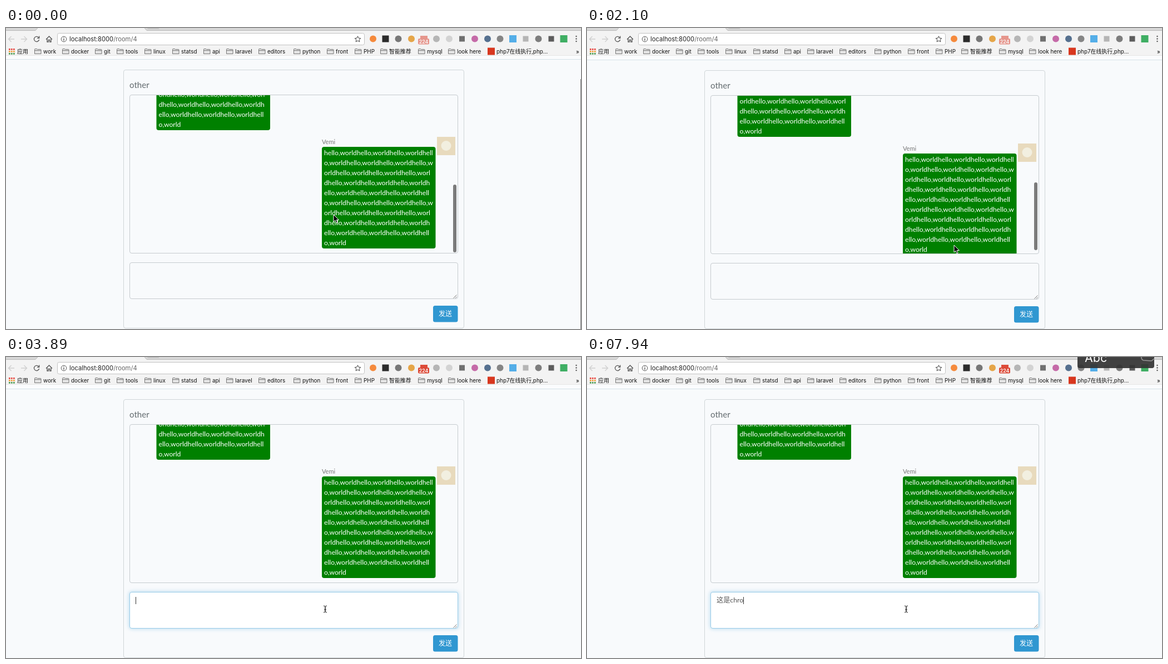
Animation, 1034 px wide and 542 px high, one loop 8 s. Source, as an HTML page:

```html
<!DOCTYPE html>
<html lang="zh">
<head>
<meta charset="utf-8">
<title>Chat room</title>
<style>
html, body { margin: 0; width: 100%; height: 100%; overflow: hidden; background: #f8fafc; }
svg { display: block; width: 1034px; height: 542px; }
text { white-space: pre; }
.ui { font: 9.9px Inter, "Noto Sans CJK SC", sans-serif; fill: #111; }
.web { font: 12.2px Lato, "Noto Sans CJK SC", sans-serif; fill: #555; }
.ime { font: 13px "Noto Sans CJK SC", "Noto Sans", sans-serif; fill: #fff; }
.ime .hot { fill: #8fd5f5; }
</style>
</head>
<body>
<svg id="stage" viewBox="0 0 1034 542" xmlns="http://www.w3.org/2000/svg">
  <defs>
    <clipPath id="chatClip"><rect x="223" y="122" width="589" height="284" rx="3"/></clipPath>
    <filter id="blur" x="-10%" y="-50%" width="120%" height="200%"><feGaussianBlur stdDeviation="3"/></filter>
    <filter id="drop" x="-10%" y="-20%" width="120%" height="150%"><feDropShadow dx="0" dy="1" stdDeviation="1" flood-opacity=".45"/></filter>
  </defs>
  <rect width="1034" height="542" fill="#f8fafc"/>

  <g id="page">
    <rect y="40" width="1034" height="17" fill="#fbfcfd"/>
    <path d="M0 57.5H1034" stroke="#d5e1e8"/>
    <g fill="none" stroke="#cfd5d8">
      <rect x="211.5" y="76.5" width="612" height="465" rx="3.5"/>
      <rect x="222.5" y="121.5" width="590" height="285" rx="3.5" stroke="#c6cbcf"/>
    </g>
    <text x="222" y="109" class="web" style="font-size:15.1px;fill:#636b6f">other</text>
    <g clip-path="url(#chatClip)">
      <g id="feed"></g>
      <rect id="thumb" x="804" width="6" height="122" rx="3" fill="#7b7b7b"/>
    </g>
    <rect id="glow" x="221" y="422" width="593" height="68" rx="5" fill="#98cbe8" opacity=".6" filter="url(#blur)"/>
    <rect id="field" x="222.5" y="423.5" width="590" height="65" rx="3.5"/>
    <path d="M804.5 487.5L810.5 481.5M808 487.5L810.5 485" stroke="#777" fill="none"/>
    <text id="typed" class="web" x="233" y="442"></text>
    <path id="under" stroke="#555"/>
    <rect id="caret" y="432" width="1" height="13" fill="#333"/>
    <rect x="768" y="501" width="44.500" height="29.500" rx="3.500" fill="#3097d1"/>
    <text x="790" y="520" text-anchor="middle" class="web" style="font-size:12px;font-weight:500;fill:#fff">发送</text>
  </g>

  <rect id="pageBar" x="1033" y="92" width="1" height="450" fill="#777"/>

  <g id="chrome">
    <rect width="1034" height="50" fill="#f3f3f3"/>
    <path d="M0 0H57L53 4.500H0ZM249 0L253 4.500H1034V0Z" fill="#d7d7d7"/>
    <path d="M0 4.500H53L57 0M249 0L253 4.500H1034" fill="none" stroke="#b9b9b9"/>
    <path d="M253 0H274L276 2H256Z" fill="#c3c3c3"/>
    <path d="M0 49.500H1034" stroke="#e6e6e6"/>
    <rect x="92.500" y="9.500" width="552" height="21" rx="3" fill="#fff" stroke="#c2c2c2"/>
    <g fill="none" stroke="#d0d0d0" stroke-width="1.300">
      <path d="M15 20H5M9.500 15L4.500 20L9.500 25M27 20H37M32.500 15L37.500 20L32.500 25"/>
      <path d="M59 17.500A4.600 4.600 0 1 0 59.600 21M59.700 14.500V18.300H56" stroke="#555"/>
      <path d="M72 20.500L77.500 15L83 20.500M74 19.500V25H76.300V21.500H78.700V25H81V19.500" stroke="#555"/>
      <circle cx="104" cy="20" r="4.800" stroke="#555" stroke-width="1"/>
      <path d="M104 19V23M104 16.700V17.900" stroke="#555"/>
      <path d="M632.500 14.700L634.100 18.200L637.900 18.600L635 21.100L635.900 24.900L632.500 22.900L629.100 24.900L630 21.100L627.100 18.600L630.900 18.200Z" stroke="#444" stroke-width="1"/>
    </g>
    <text x="114" y="24" class="ui" style="font-size:11.200px;fill:#222">localhost:8000<tspan fill="#666">/room/4</tspan></text>
    <g id="icons"></g>
    <g id="marks"></g>
  </g>

  <g id="hud">
    <path d="M882 0H1020V16Q1020 20 1016 20H886Q882 20 882 16Z" fill="#333" opacity=".92"/>
    <path d="M997 0V1Q997 5 1001 6L1015 7L1020 3" fill="none" stroke="#999" stroke-width="1.500"/>
    <text id="mode" class="ui" x="895" y="9" style="font-size:21.500px;fill:#fff"></text>
  </g>

  <g id="ime" class="ime">
    <rect id="imeBox" x="235" y="447" height="46" rx="3" fill="#484848" filter="url(#drop)"/>
    <text id="pinyin" class="hot" x="246" y="463"></text>
    <rect id="imeCaret" y="451" width="1" height="15" fill="#fff"/>
    <g id="words"></g>
    <g id="pager" fill="none" stroke-width="1.700">
      <path d="M-16 480L-19 483L-16 486" stroke="#999"/>
      <path d="M-11 480L-8 483L-11 486" stroke="#8fd5f5"/>
    </g>
  </g>

  <path id="arrow" d="M0 0V13L3 10.300L5 15L7.200 14L5.200 9.500H9.300Z" fill="#000" stroke="#fff" stroke-width="1"/>
  <g id="beam" fill="none">
    <path d="M571 448Q574 448 574 450V458Q574 460 571 460M577 448Q574 448 574 450V458Q574 460 577 460" stroke="#fff" stroke-width="2.500" opacity=".7"/>
    <path d="M571 448Q574 448 574 450V458Q574 460 571 460M577 448Q574 448 574 450V458Q574 460 577 460M572 455H576" stroke="#222"/>
  </g>
</svg>
<script>
const LOOP = 8000;
const $ = id => document.getElementById(id);
const set = (el, attrs) => { for (const k in attrs) el.setAttribute(k, attrs[k]); };

function add(parent, tag, attrs, text) {
  const el = document.createElementNS("http://www.w3.org/2000/svg", tag);
  set(el, attrs);
  if (text) el.textContent = text;
  parent.appendChild(el);
  return el;
}

// Value of the latest [time, value] pair that has started
function at(keys, t) {
  let v = keys[0][1];
  for (const [k, x] of keys) if (t >= k) v = x;
  return v;
}

function bubble(x, y) {
  const feed = $("feed"), all = "hello,world".repeat(30);
  add(feed, "rect", { x, y, width: 204.5, height: 183, rx: 4, fill: "#008000" });
  let from = 0;
  [37, 36, 36, 35, 36, 36, 36, 35, 36, 7].forEach((n, i) => {
    add(feed, "text", { x: x + 4, y: y + 15 + i * 18, class: "web", style: "fill:#fff" }, all.slice(from, from + n));
    from += n;
  });
}

function buildFeed() {
  bubble(270.5, 2);
  bubble(568, 215);
  add($("feed"), "text", { x: 568, y: 210, class: "web", style: "font-size:11px;fill:#777" }, "Vemi");
  add($("feed"), "rect", { x: 775, y: 197, width: 33, height: 33, fill: "#e8dabd" });
  add($("feed"), "circle", { cx: 791.5, cy: 213, r: 9, fill: "#f2efe0" });
}

function buildMarks() {
  const g = $("marks");
  const colors = ["#e8453c", "#f29d38", "#4a9b50"];
  for (let i = 0; i < 9; i++)
    add(g, "rect", { x: 5 + i % 3 * 4, y: 37 + (i / 3 | 0) * 4, width: 2.7, height: 2.7, fill: colors[i / 3 | 0] });
  const label = (x, s) => add(g, "text", { x, y: 45.6, class: "ui" }, s);
  label(20, "应用");
  const folders = { work: 51, docker: 101, git: 160, tools: 199, linux: 249, statsd: 299, api: 355, laravel: 396,
    editors: 454, python: 517, front: 577, PHP: 627, "智能推荐": 673, mysql: 741, "look here": 795 };
  for (const name in folders) {
    const x = folders[name];
    add(g, "path", { d: `M${x + .5} 46.500V38.500Q${x + .5} 37.500 ${x + 1.5} 37.500H${x + 4.5}L${x + 5.5} 38.500H${x + 11}Q${x + 12} 38.500 ${x + 12} 39.500V46.500ZM${x + .5} 40.500H${x + 12}`,
      fill: "#e4e4e4", stroke: "#6b6b6b", "stroke-width": .9 });
    label(x + 16, name);
  }
  add(g, "rect", { x: 866, y: 35.5, width: 13, height: 13, fill: "#d8371f" });
  label(882, "php7在线执行,php...");
  label(1025, "»");
}

function buildIcons() {
  const g = $("icons");
  const dot = (cx, fill, r = 6) => add(g, "circle", { cx, cy: 19.5, r, fill });
  const box = (cx, fill, s = 12) => add(g, "rect", { x: cx - s / 2, y: 19.5 - s / 2, width: s, height: s, fill });
  dot(660, "#f58a3c");
  box(682.5, "#2b2b2b");
  dot(705.5, "#777");
  dot(729, "#e5a548");
  box(774, "#f3f3f3", 1);
  dot(774, "#b5b5b5");
  dot(797, "#d3d3d3");
  box(820, "#707070", 10);
  dot(843, "#c56aa8");
  dot(866, "#55708f");
  dot(888.5, "#858585");
  box(911.5, "#54aee8", 13);
  box(934.5, "#b5b5b5", 10);
  dot(957.5, "#7d7d7d");
  box(980.5, "#5c5c5c", 10);
  box(1003, "#3fae63", 13);
  for (const cy of [15, 19.5, 24]) add(g, "circle", { cx: 1025.5, cy, r: 1.2, fill: "#555" });
  const badge = add(g, "g", { id: "badge" });
  add(badge, "rect", { x: 745, y: 14, width: 13, height: 9, fill: "#dd4b39" });
  add(badge, "rect", { x: 741, y: 19, width: 20, height: 10.5, rx: 2, fill: "#dc4a38" });
  add(badge, "text", { x: 751, y: 27.5, "text-anchor": "middle", class: "ui", style: "font-size:8.800px;font-weight:600;fill:#fff" }, "224");
}

const scroll = [[0, 0], [150, 5], [330, 20], [510, 40], [720, 57], [920, 66], [1070, 68], [2100, 11], [2250, 0]];
const barFade = [[0, 1], [2570, .8], [2750, .4], [2930, 0]];
const pageFade = [[0, 1], [1350, .6], [1500, .3], [1650, 0], [2250, 1], [3290, .5], [3440, 0]];
const pointer = [[0, [589, 336]], [1210, [600, 346]], [1350, [628, 368]], [1500, [650, 385]], [1650, [660, 391]],
  [2250, [645, 405]], [2420, [608, 434]], [2570, [580, 450]], [2750, [573.5, 453]]];
const text = [[0, ""], [4640, "z"], [4940, ""], [5540, "z"], [5690, "zh"], [5840, "zhe"], [5990, "zhe'sh"], [6140, "zhe'shi"],
  [6440, "这是"], [7490, "这是c"], [7640, "这是ch"], [7790, "这是chr"], [7940, "这是chro"]];
const caretOn = [[0, 0], [3890, 1], [4340, 0], [4640, 1], [6890, 0], [7340, 1]];
const hudFade = [[0, 0], [4940, .4], [5090, .8], [5240, 1]];
const choices = {
  z: "在 中 做 再 总", zh: "这 中 只 正 找", zhe: "这 着 者 折 哲",
  "zhe'sh": "这是 这时候 这事 这上 折射", "zhe'shi": "这是 这事 这时 赭石 折实"
};

function drawIme(pinyin) {
  $("pinyin").textContent = pinyin;
  set($("imeCaret"), { x: 246.5 + $("pinyin").getComputedTextLength() });
  const g = $("words");
  g.replaceChildren();
  let x = 247;
  choices[pinyin].split(" ").forEach((w, i) => {
    const el = add(g, "text", { x, y: 484, class: i ? "" : "hot" }, `${i + 1}.${w}`);
    x += el.getComputedTextLength() + 10.5;
  });
  const right = x + 24;
  set($("imeBox"), { width: right - 235 });
  set($("pager"), { transform: `translate(${right - 1.5})` });
}

function show(id, on) { set($(id), { opacity: +on }); }

let last = null;
function draw(t) {
  set($("page"), { transform: `translate(0 ${t < 150 ? -1 : 0})` });
  const off = at(scroll, t);
  set($("feed"), { transform: `translate(0 ${off})` });
  set($("thumb"), { y: 283 - off * 30 / 66 });
  show("thumb", at(barFade, t));
  show("pageBar", at(pageFade, t));
  show("badge", t < 2930 ? .55 : 1);

  const [px, py] = at(pointer, t);
  set($("arrow"), { transform: `translate(${px} ${py})` });
  show("arrow", t < 2930);
  show("beam", t >= 2930);

  const focus = at([[0, 0], [3740, .5], [3890, 1]], t);
  show("glow", focus * .6);
  set($("field"), { fill: focus ? "#fff" : "#f8fafc", stroke: focus ? "#98cbe8" : "#c6cbcf" });

  const typed = at(text, t), composing = t >= 5540 && t < 6440;
  $("typed").textContent = typed;
  const end = 233 + (typed ? $("typed").getComputedTextLength() : 0);
  set($("caret"), { x: Math.round(end) });
  show("caret", at(caretOn, t));
  set($("under"), { d: `M233 444.500H${end}` });
  show("under", composing);
  show("ime", composing);
  if (composing && typed !== last) drawIme(typed);
  last = composing ? typed : null;

  show("hud", at(hudFade, t));
  $("mode").textContent = t < 7340 ? "中文" : "Abc";
}

buildFeed();
buildMarks();
buildIcons();
const start = performance.now();
function tick() {
  draw((performance.now() - start) % LOOP);
  requestAnimationFrame(tick);
}
tick();
</script>
</body>
</html>
```
